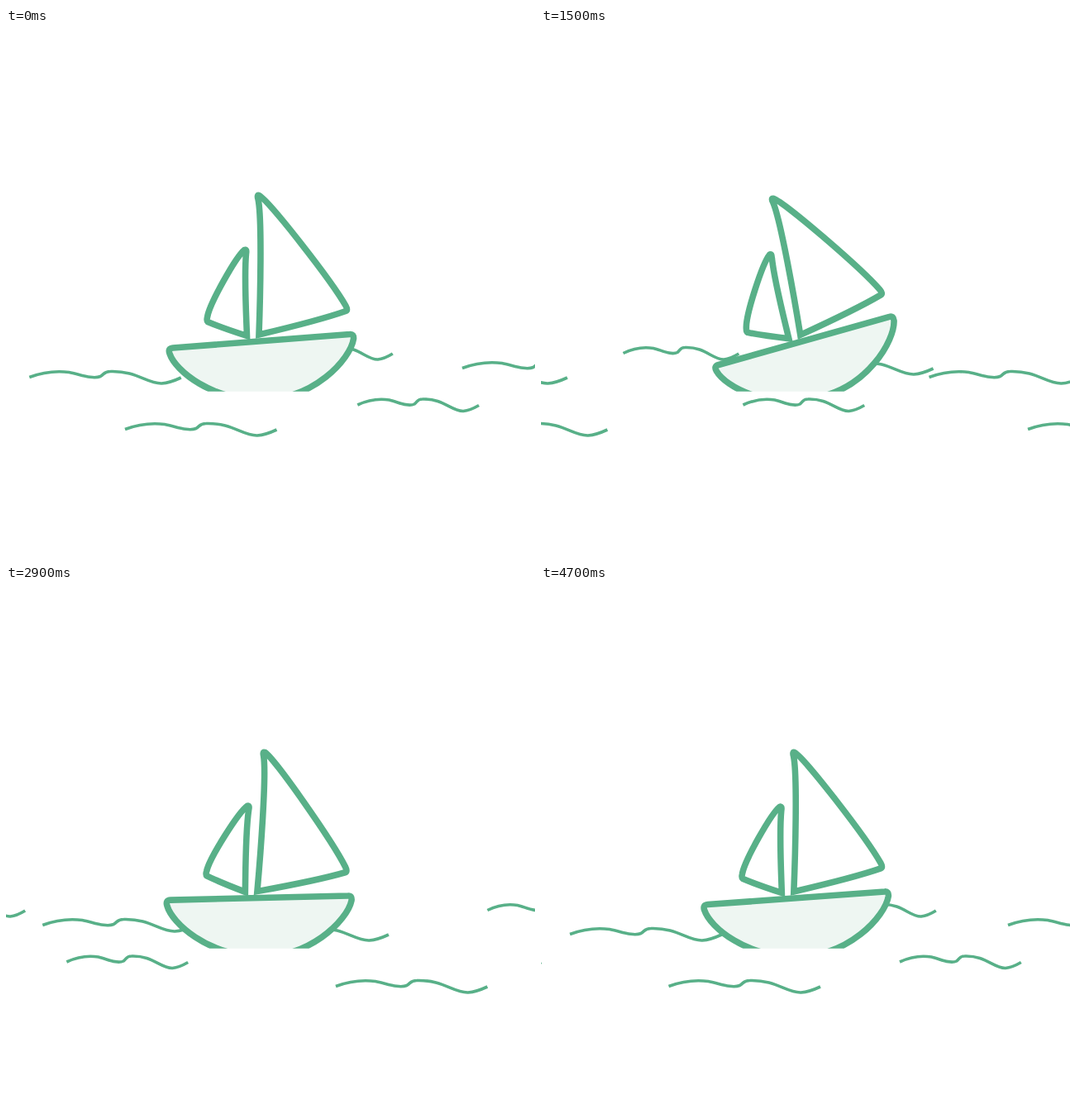
Animation of 640 by 640 pixels, one loop 4.8 s. Source, as an HTML page:

```html
<!DOCTYPE html>
<html lang="en">
<head>
<meta charset="utf-8">
<title>Sailing boat</title>
<style>
  html, body { margin: 0; width: 100%; height: 100%; overflow: hidden; background: #fff; }
  svg { display: block; width: 100vw; height: 100vh; }
  path { fill: none; stroke: #58b088; }
  .wave { stroke-width: 3.6; vector-effect: non-scaling-stroke; }
  .boat { stroke-width: 7.6; }
  .hull { fill: #eef6f2; }
</style>
</head>
<body>
<svg viewBox="0 0 640 640">
  <defs>
    <clipPath id="waterline"><rect width="640" height="439.7"/></clipPath>
    <path id="wave" class="wave" d="M0 0C16-6 32-8 48-6C60-4 76 3 86-1C91-4 90-7 98-7C130-8 142 8 160 7.5C168 7 176 4 183.5.5"/>
  </defs>
  <g id="sea"></g>
  <g clip-path="url(#waterline)">
    <g id="boat">
      <path class="boat hull" d="M202 387L416 370.5Q421 370 420.5 376C417 400 372 451 308 449C250 451 205 415 198 394Q195.500 387.500 202 387Z"/>
      <path class="boat" d="M306 371C307.500 330 310 230 305 207Q303.500 202 306 202.500C316 206 394 306 411 336Q414 341.500 411 342.500C384 352 344 362 306 371Z"/>
      <path class="boat" d="M291.500 372.500C290.500 345 288 300 290.500 273Q291.500 267 288.500 268.500C278 277 246 334 243.500 350Q242.500 354.500 244 355.500C257 361 276 367.500 291.500 372.500Z"/>
    </g>
  </g>
</svg>
<script>
const LOOP = 4800, HOLD = 100, TICK = 40;
const PIVOT = '312 332';
const RETURN_SPEED = 0.1358, RETURN_TIME = 4680;

// Each wave leaves to the left at its own speed, then comes back in from the right.
const waves = [
  { y: 422.5, width: 1,     from: 28.3,  speed: 0.1216, back: 35 },
  { y: 393.5, width: 0.762, from: 328,   speed: 0.1544, back: 338 },
  { y: 411.5, width: 1,     from: 552,   speed: 0.1763, back: 565 },
  { y: 456,   width: 0.8,   from: 425.3, speed: 0.1222, back: 434 },
  { y: 485.5, width: 1,     from: 144,   speed: 0.1670, back: 154.5 }
];

// Rocking: time, angle, slope (degrees per ms)
const rock = [
  [0, 0, 0], [1280, -12, 0], [2080, -5, 0.0105],
  [2880, 3.04, 0.0092], [3600, 8.5, 0], [LOOP, 0, 0]
];

const sea = document.getElementById('sea');
const boat = document.getElementById('boat');

function addWave() {
  const use = document.createElementNS('http://www.w3.org/2000/svg', 'use');
  use.setAttribute('href', '#wave');
  return sea.appendChild(use);
}
for (const w of waves) w.copies = [addWave(), addWave()];

function angleAt(t) {
  const i = rock.findIndex(key => t < key[0]);
  const [t0, a0, s0] = rock[i - 1], [t1, a1, s1] = rock[i];
  const d = t1 - t0, u = (t - t0) / d, v = 1 - u;
  return a0 * v * v * (1 + 2 * u) + a1 * u * u * (3 - 2 * u)
    + d * u * v * (s0 * v - s1 * u);
}

function draw(t) {
  for (const w of waves) {
    const xs = [w.from - w.speed * t, w.back + RETURN_SPEED * (RETURN_TIME - t)];
    w.copies.forEach((copy, i) =>
      copy.setAttribute('transform', `translate(${xs[i]} ${w.y}) scale(${w.width} 1)`));
  }
  boat.setAttribute('transform', `rotate(${angleAt(t)} ${PIVOT})`);
}

const snap = (t, step) => Math.floor(t / step) * step;
const start = performance.now();

// Poses are held for 100 ms and fall on a 25 per second time grid.
function frame() {
  const t = (performance.now() - start) % LOOP;
  draw(snap(snap(t, HOLD), TICK));
  requestAnimationFrame(frame);
}
frame();
</script>
</body>
</html>
```
